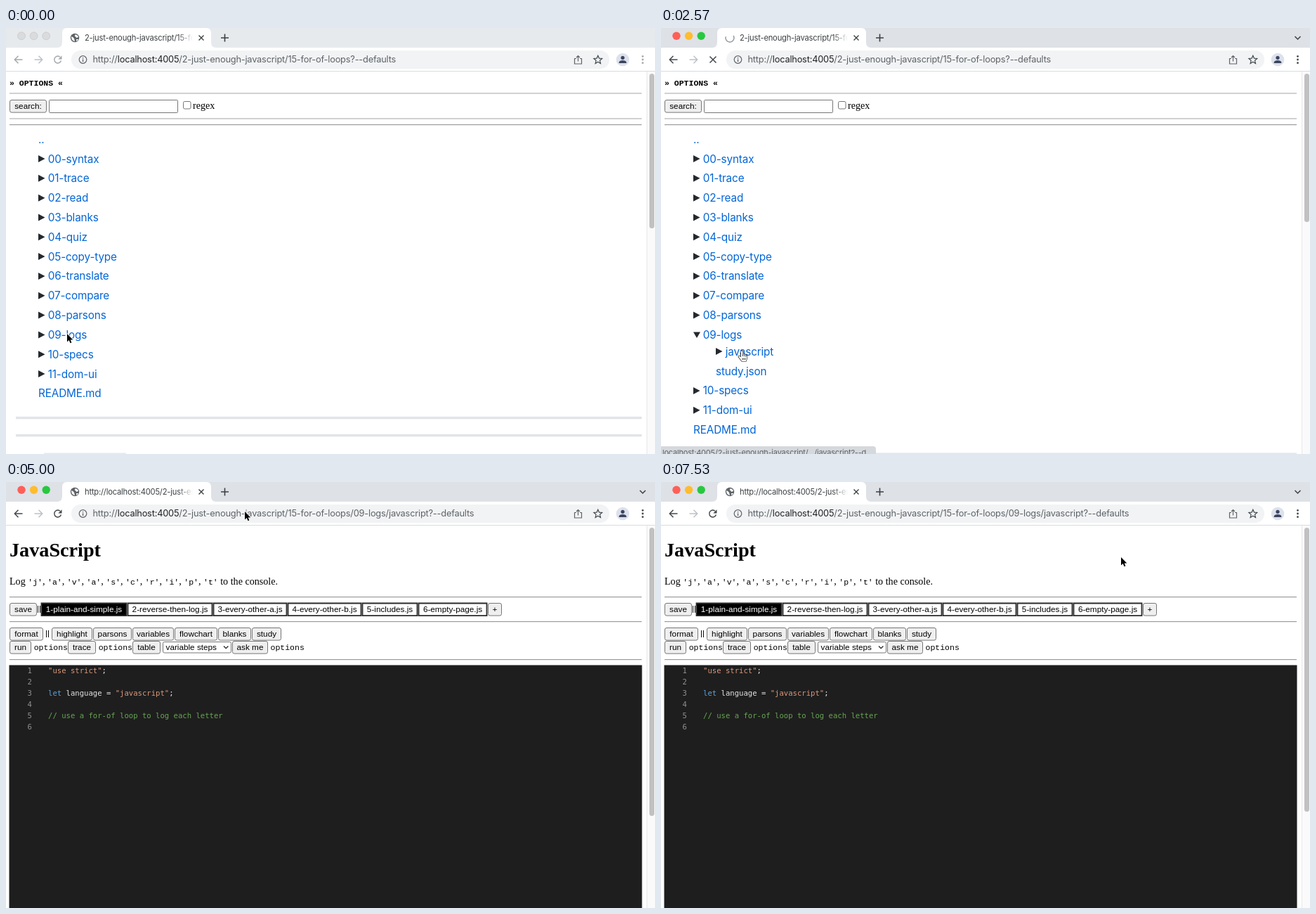
An HTML page with a canvas that plays this animation: 924x606 px, repeating every 8 s.

```html
<!DOCTYPE html>
<html lang="en">
<head>
<meta charset="utf-8">
<title>Browser session</title>
<style>
html, body { margin: 0; width: 100%; height: 100%; overflow: hidden; background: #fff; }
canvas { display: block; }
</style>
</head>
<body>
<canvas id="stage" width="924" height="606"></canvas>
<script>
const ctx = document.getElementById("stage").getContext("2d");
const LOOP = 8000;
const T = { focus: 920, hand: 1070, expand: 1370, bubble: 2420, load: 2570, commit: 2870, page: 3010,
  fade: 3290, idle: 3460, tools: 3940, editor: 5000, settle: 5150, caret: 5450, ring: 5600, select: 5740, blur: 7090 };

const SERIF = "14.1px 'Liberation Serif', serif";
const MONO = "11.5px 'Liberation Mono', monospace";
const CODE = "10.6px 'DejaVu Sans Mono', monospace";
const BUTTON = "11.75px 'Liberation Sans', sans-serif";
const ui = size => size + "px Inter, sans-serif";
const GREY = "#5f6368", DARK = "#202124", LINK = "#0366d6";

const FOLDERS = ["00-syntax", "01-trace", "02-read", "03-blanks", "04-quiz", "05-copy-type",
  "06-translate", "07-compare", "08-parsons", "09-logs", "10-specs", "11-dom-ui"];
const FILES = [["1-plain-and-simple.js", 50, 172], ["2-reverse-then-log.js", 173, 294], ["3-every-other-a.js", 295, 400],
  ["4-every-other-b.js", 401, 506], ["5-includes.js", 507, 586], ["6-empty-page.js", 587, 685]];
const LENSES = [["highlight", 65, 123], ["parsons", 124, 179], ["variables", 180, 239],
  ["flowchart", 240, 301], ["blanks", 302, 349], ["study", 350, 392]];
const RUNNERS = [["run", 5, 36], ["trace", 88, 128], ["table", 180, 220], ["ask me", 322, 373]];

// Pointer moves: first change, last change, number of changes, destination.
const MOVES = [[140, 1070, 7, 47, 434], [1520, 2270, 6, 115, 459], [3940, 4490, 4, 340, 42],
  [6790, 7090, 3, 480, 212], [7230, 7530, 3, 655, 107]];

const ARROW = new Path2D("M0 0V11.6L2.7 9.1 4.5 13.2 6.4 12.4 4.7 8.4H8.3Z");
const HAND = new Path2D("M-1.1 1Q.2-.7 1.4 1V5Q2.8 4 3.7 5.4Q5 4.8 5.8 6.2Q7.4 6 7.5 7.8V10Q7 12.5 6 15H0Q-2 12-4.8 8.8Q-4.6 6.8-2.8 7.8L-1.1 9.2Z");
const BEAM = new Path2D("M-3-6.5Q0-6.5 0-4.5Q0-6.5 3-6.5M0-4.5V4.5M-3 6.5Q0 6.5 0 4.5Q0 6.5 3 6.5M-1.5 1.5H1.5");

function text(string, x, y, font, color = "#000", spacing = 0, align = "left") {
  ctx.font = font;
  ctx.fillStyle = color;
  ctx.letterSpacing = spacing + "px";
  ctx.textAlign = align;
  ctx.fillText(string, x, y);
  return x + ctx.measureText(string).width;
}

function rect(x, y, w, h, color) {
  ctx.fillStyle = color;
  ctx.fillRect(x, y, w, h);
}

function box(x, y, w, h, radius, fill, stroke, width = 1) {
  ctx.beginPath();
  ctx.roundRect(x, y, w, h, radius);
  if (fill) { ctx.fillStyle = fill; ctx.fill(); }
  if (stroke) { ctx.strokeStyle = stroke; ctx.lineWidth = width; ctx.stroke(); }
}

function disc(x, y, r, fill) {
  ctx.beginPath();
  ctx.arc(x, y, r, 0, 7);
  ctx.fillStyle = fill;
  ctx.fill();
}

function arc(x, y, r, from, to, color, width) {
  ctx.beginPath();
  ctx.arc(x, y, r, from, to);
  ctx.strokeStyle = color;
  ctx.lineWidth = width;
  ctx.stroke();
}

function line(path, color, width = 1.5) {
  ctx.strokeStyle = color;
  ctx.lineWidth = width;
  ctx.stroke(new Path2D(path));
}

function shape(path, color) {
  ctx.fillStyle = color;
  ctx.fill(new Path2D(path));
}

function rule(y) {
  rect(5, y - 0.5, 900, 1, "#999");
  rect(5, y + 0.5, 900, 0.6, "#e4e4e4");
}

function button(label, left, right, y, style = {}) {
  const { fill = "#efefef", color = "#000", stroke = "#767676", width = 1, radius = 2.5 } = style;
  box(left + 0.5, y + 0.5, right - left - 1, 17.6, radius, fill, stroke, width);
  text(label, (left + right) / 2, y + 13, BUTTON, color, 0, "center");
}

function drawTab(t, focused) {
  rect(0, 0, 924, 28, focused ? "#dee1e6" : "#e7eaed");
  shape("M73 28Q80 28 80 20V7Q80 0 87 0H285Q292 0 292 7V20Q292 28 299 28Z", "#fff");
  ["#ff5f57", "#febc2e", "#28c840"].forEach((color, i) => {
    const x = 22 + i * 17.6;
    disc(x, 11.3, 5.7, focused ? color : "#d9dbdd");
    if (!focused) arc(x, 11.3, 5.4, 0, 7, "#c6c8ca", 0.7);
  });

  const loading = t >= T.load && t < T.tools;
  if (loading) {
    const turn = Math.min(t, T.idle) / 150;
    const start = Math.floor(turn) * 1.1 - 0.4;
    arc(98, 14, 6, start, start + 4, t < T.commit ? "#9aa0a6" : "#f54bb5", 1.6);
  } else {
    disc(98, 14, 6.2, GREY);
    shape("M93 12Q96 13 97 15L98 19Q93 18 93 12ZM98 9.5Q102 9 103 13L100 14Q100 12 98 12ZM100 16H103Q102 18 100.5 19Z", "#fff");
  }
  const title = t < T.commit ? "2-just-enough-javascript/15-for-of-loops" : "http://localhost:4005/2-just-enough";
  ctx.save();
  ctx.beginPath();
  ctx.rect(112, 0, 154, 28);
  ctx.clip();
  text(title, 112, 18, ui(11.2), "#3c4043", -0.2);
  const veil = ctx.createLinearGradient(245, 0, 266, 0);
  veil.addColorStop(0, "#fff0");
  veil.addColorStop(1, "#fff");
  rect(245, 0, 22, 28, veil);
  ctx.restore();
  line("M274.5 10.5l7 7m0-7l-7 7", "#3c4043", 1.4);
  line("M306 14h11m-5.5-5.5v11", "#3c4043", 1.6);
  if (focused) line("M902.5 12l4 4 4-4", "#3c4043", 1.5);
}

function drawToolbar(t, focused) {
  const ink = focused ? "#45494d" : "#a5a8ab";
  rect(0, 28, 924, 33, "#fff");
  rect(0, 61, 924, 1, "#dadce0");
  line("M23.5 45H12.5M17.5 39.8L12.3 45l5.2 5.2", ink);
  line("M40.5 45H51.5M46.5 39.8L51.7 45l-5.2 5.2", "#bdc1c6");
  if (t >= T.load && t < T.tools) {
    line("M69.5 40.5l9 9m0-9l-9 9", ink);
  } else {
    arc(73.7, 45, 4.9, 0.3, 5.4, ink, 1.5);
    shape("M79.5 39.2V44.4H74.3Z", ink);
  }

  const selected = t >= T.select && t < T.blur;
  const ringed = t >= T.ring && t < T.blur;
  if (ringed) box(94, 33, 764, 24.5, 12.2, "#fff", "#f52aae", 2);
  else box(93, 32, 766, 26, 13, "#f1f3f4");
  arc(109.5, 45, 5.3, 0, 7, GREY, 1.2);
  rect(108.9, 44.4, 1.3, 3.6, GREY);
  rect(108.9, 42, 1.3, 1.3, GREY);

  const path = "/2-just-enough-javascript/15-for-of-loops" + (t < T.commit ? "" : "/09-logs/javascript") + "?--defaults";
  if (selected) rect(123, 38, 542, 15.5, "#b6f7a8");
  let x = 123.5;
  for (const [part, color] of [["http://", GREY], ["localhost:4005", DARK], [path, GREY]])
    x = text(part, x, 49, ui(12.8), selected ? "#2c3a2c" : color, -0.2);

  line("M812 43.5h-2.5v7.5h10v-7.5H817M814.5 47.5V39.5M812 42l2.5-2.5 2.5 2.5", GREY, 1.2);
  line("M842.8 39.2l1.7 3.9 4.2.4-3.2 2.8 1 4.2-3.7-2.2-3.7 2.2 1-4.2-3.2-2.8 4.2-.4z", "#45494d", 1.2);
  disc(878, 45, 9.3, "#dde1ec");
  disc(878, 42.3, 2.6, "#3b4560");
  shape("M872.7 50V48.7Q873.5 46 878 46T883.3 48.7V50Z", "#3b4560");
  for (const y of [40.3, 45, 49.7]) disc(906.5, y, 1.4, ink);
}

function drawScrollbar(bottom) {
  rect(912, 62, 12, 544, "#fafafa");
  rect(912, 62, 1, 544, "#e8e8e8");
  if (bottom) box(916, 65, 7, bottom - 65, 3.5, "#c1c1c1");
}

function treeRow(label, x, y, state) {
  const color = "#24292e";
  if (state === "open") shape(`M${x} ${y - 4}h10l-5 8.5z`, color);
  if (state === "closed") shape(`M${x} ${y - 5}v10l9.5-5z`, color);
  text(label, state ? x + 13.7 : x, y + 5.5, ui(15.3), LINK, -0.15);
}

function drawFolders(expanded) {
  text("» OPTIONS «", 5, 82, "bold " + MONO);
  [93, 129, 137.5].forEach(rule);
  button("search:", 5, 58, 102);
  box(61.5, 102.5, 183, 18, 1, "#fff", "#767676");
  box(252.5, 104.5, 10.5, 10.5, 2, "#fff", "#767676");
  text("regex", 266, 115, SERIF);

  const shift = expanded ? 51.7 : 0;
  const rowY = i => 186 + i * 27.82 + (i > 9 ? shift : 0);
  treeRow("..", 46, 158);
  FOLDERS.forEach((name, i) => treeRow(name, 46, rowY(i), expanded && i === 9 ? "open" : "closed"));
  treeRow("README.md", 46, rowY(12));
  if (expanded) {
    treeRow("javascript", 78, 460, "closed");
    treeRow("study.json", 78, 488);
  }
  for (const y of [552.8, 577.8]) rect(14, y + shift, 891, 3.5, "#e1e4e8");
  rect(54, 604.5 + shift, 117, 2, "#e6e8ea");
  drawScrollbar(expanded ? 276 : 285);
}

function drawEditor() {
  rect(4.5, 260.5, 901, 346, "#1e1e1e");
  const plain = "#e4e4e4", string = "#da987c";
  const lines = [[['"use strict"', string], [";", plain]], [],
    [["let", "#5ba3dd"], [" language = ", plain], ['"javascript"', string], [";", plain]], [],
    [["// use a for-of loop to log each letter", "#67a553"]], []];
  lines.forEach((parts, i) => {
    const y = 272 + i * 16;
    text(i + 1, 37, y, CODE, "#919191", 0, "right");
    let x = 60;
    for (const [part, color] of parts) x = text(part, x, y, CODE, color);
  });
}

function drawExercise(t) {
  text("JavaScript", 5, 106, "bold 28.2px 'Liberation Serif', serif");
  let x = text("Log ", 5, 146, SERIF);
  [..."javascript"].forEach((letter, i) => {
    if (i) x = text(", ", x, 146, SERIF);
    x = text(`'${letter}'`, x, 146, MONO);
  });
  text(" to the console.", x, 146, SERIF);

  const tools = t >= T.tools, editor = t >= T.editor;
  [163.5, 198.5, tools ? 252.5 : 233.5].forEach(rule);
  button("save", 5, 44, 172);
  FILES.forEach(([name, left, right], i) => button(name, left, right, 172, editor ? {
    fill: i ? "#fff" : "#000", color: i ? "#000" : "#fff", stroke: "#2b2b2b", width: 1.8, radius: 0 } : {}));
  button("+", 686, 706, 172);
  button("format", 5, 53, 207);
  text("||", 44, 183.5, BUTTON);
  text("||", 56, 218.5, BUTTON);
  if (tools) {
    for (const [name, left, right] of LENSES) button(name, left, right, 207);
    for (const [name, left, right] of RUNNERS) button(name, left, right, 226);
    for (const left of [39.7, 131.7, 376.5]) text("options", left, 239, MONO);
    box(223.5, 227.5, 97, 15.5, 2, "#fff", "#767676");
    text("variable steps", 227.5, 239, BUTTON);
    line("M310 233.5l3.2 3.2 3.2-3.2", "#222", 1.3);
  }
  if (editor) drawEditor();
  drawScrollbar(t < T.tools ? 487 : t < T.settle ? 475 : 469);
}

function drawBubble(t) {
  if (t < T.bubble || t >= T.idle) return;
  ctx.globalAlpha = t >= T.fade || t < T.load ? 0.6 : 1;
  box(-2, 595, 308, 14, 4, "#d5d8dc");
  text("localhost:4005/2-just-enough-javascript/…/javascript?--d…", 2, 607.5, ui(11), GREY, -0.2);
  ctx.globalAlpha = 1;
}

function pointerAt(t) {
  let x = 87, y = 435;
  for (const [start, end, count, toX, toY] of MOVES) {
    if (t < start) break;
    const change = Math.floor((t - start) / (end - start) * (count - 1) + 1e-6) + 1;
    const p = Math.min(1, change / count);
    const eased = p * p * (3 - 2 * p);
    x += (toX - x) * eased;
    y += (toY - y) * eased;
  }
  return [x, y];
}

function drawPointer(t) {
  const [x, y] = pointerAt(t);
  ctx.save();
  ctx.lineJoin = "round";
  if (t >= T.caret && t < 6790) {
    ctx.translate(x, 44.5);
    ctx.strokeStyle = "#fff";
    ctx.lineWidth = 2.4;
    ctx.stroke(BEAM);
    ctx.strokeStyle = "#000";
    ctx.lineWidth = 1.1;
    ctx.stroke(BEAM);
  } else {
    const hand = t >= T.hand && t < T.tools;
    ctx.translate(x, y);
    ctx.strokeStyle = hand ? "#000" : "#fff";
    ctx.fillStyle = hand ? "#fff" : "#000";
    ctx.lineWidth = hand ? 1.2 : 1.6;
    ctx.stroke(hand ? HAND : ARROW);
    ctx.fill(hand ? HAND : ARROW);
    if (hand) line("M1.4 5V8M3.7 5.6V8.2M5.8 6.4V8.6M1 10.5V13M3 10.5V13M5 10.5V13", "#000", 0.8);
  }
  ctx.restore();
}

function draw(now) {
  const t = now % LOOP;
  const focused = t >= T.focus;
  rect(0, 0, 924, 606, "#fff");
  if (t < T.commit) drawFolders(t >= T.expand);
  else if (t >= T.page) drawExercise(t);
  else drawScrollbar(0);
  drawTab(t, focused);
  drawToolbar(t, focused);
  drawBubble(t);
  drawPointer(t);
}

const origin = performance.now();
function tick() {
  draw(performance.now() - origin);
  requestAnimationFrame(tick);
}
tick();
</script>
</body>
</html>
```
